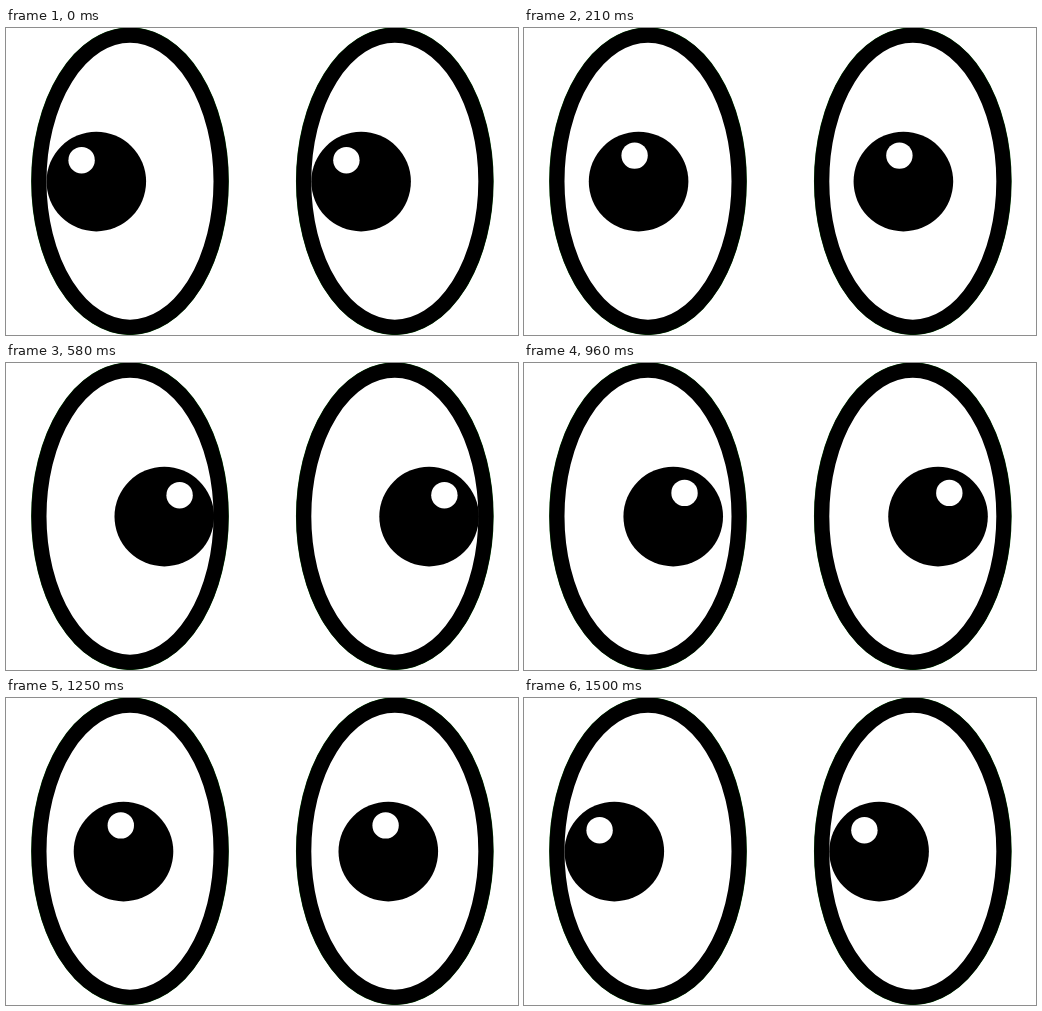
An HTML page that plays this animation: 512 px wide and 307 px high, repeating every 1.79 s.

```html
<!DOCTYPE html>
<html lang="en">
<head>
<meta charset="utf-8">
<title>Looking eyes</title>
<style>
  /* gaze: -1 is far left, 1 is far right */
  @property --gaze {
    syntax: "<number>";
    inherits: true;
    initial-value: -1;
  }
  html, body {
    margin: 0;
    width: 100%;
    height: 100%;
    overflow: hidden;
    background: #fff;
  }
  svg {
    display: block;
    width: 512px;
    height: 307px;
    animation: look 1790ms -4ms infinite;
  }
  .rim { fill: none; stroke: #004a00; stroke-width: 15.7; }
  .eye { fill: #fff; stroke: #000; stroke-width: 15; }
  .pupil { transform: translateX(calc(var(--gaze) * 34px)); }
  .glint {
    fill: #fff;
    transform: translate(calc(var(--gaze) * 49px), calc(var(--gaze) * var(--gaze) * 5px));
  }
  /* 24 steps per second; the way back sets off with a double step */
  @keyframes look {
    0% { --gaze: -1; animation-timing-function: steps(14); }
    32.588% { --gaze: 1; animation-timing-function: step-end; }
    53.631% { --gaze: 0.7333; animation-timing-function: steps(13); }
    83.892%, 100% { --gaze: -1; }
  }
</style>
</head>
<body>
<svg viewBox="0 0 512 307">
  <defs>
    <g id="eye">
      <ellipse class="rim" cx="124" cy="153.2" rx="91" ry="146"/>
      <ellipse class="eye" cx="124" cy="153.2" rx="91" ry="146"/>
      <circle class="pupil" cx="124.3" cy="153.6" r="49.8"/>
      <circle class="glint" cx="124.6" cy="127.2" r="13.2"/>
    </g>
  </defs>
  <use href="#eye"/>
  <use href="#eye" x="264.8"/>
</svg>
</body>
</html>
```
